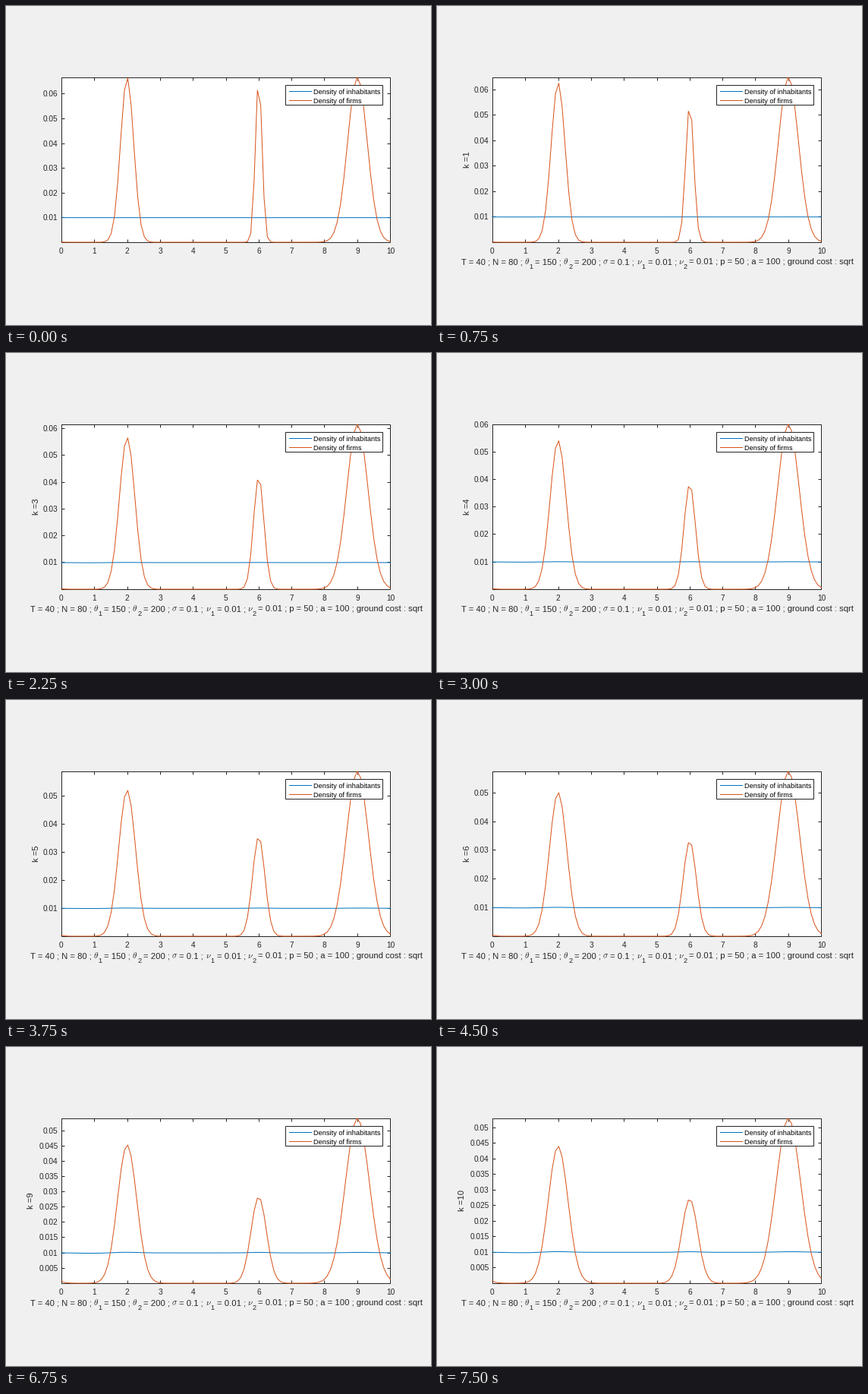
Write a matplotlib script that moves like this. It is 560 px wide and 420 px high and loops after 8 s.

```python
import numpy as np
import matplotlib as mpl
import matplotlib.pyplot as plt
from matplotlib.animation import FuncAnimation
from matplotlib.patches import Rectangle

mpl.rcParams["font.family"] = "Liberation Sans"
mpl.rcParams["mathtext.fontset"] = "cm"

W, H, DPI = 560, 420, 100
PX = 72 / DPI
FONT_SCALE = 1.018
STEP_MS, TICKS_PER_STEP, FRAMES = 250, 3, 32

# Data area, and the pixel lines of its border
LEFT, RIGHT, TOP, BOTTOM = 72.9, 506.4, 94.0, 311.0
X0, X1, Y0, Y1 = 73, 506, 94, 311
INK = "#262626"
BLUE, ORANGE = "#0072bd", "#d95319"
TICK = 4

# Peaks of the firm density: centre, spread, slow loss per step
PEAKS = ((2, 0.2, 0.001), (6, 0.1, 0.0006), (9, 0.3, 0.001))
SPREAD = 0.005
FLOOR = 0.001

x = np.linspace(0, 10, 100)


def bump(centre, var):
    # The domain is periodic
    return sum(np.exp(-(x - centre - s) ** 2 / (2 * var))
               for s in (-10.1, 0, 10.1))


def firms(k):
    total = sum(bump(c, s * s) for c, s, _ in PEAKS) + FLOOR
    y = np.full_like(x, FLOOR)
    for c, s, loss in PEAKS:
        var = s * s + SPREAD * k
        y += (1 - loss * k) * s / np.sqrt(var) * bump(c, var)
    return y / total.sum()


def inhabitants(k):
    rise = bump(1.95, 0.14) + 0.8 * bump(6, 0.09) + 0.8 * bump(9.1, 0.2)
    return 0.01 + k * 1e-5 * (2.2 * rise - 1.4 * bump(0.95, 0.2))


fig = plt.figure(figsize=(W / DPI, H / DPI), dpi=DPI, facecolor="#f0f0f0")
ax = fig.add_axes([0, 0, 1, 1])
ax.set_xlim(0, W)
ax.set_ylim(H, 0)
ax.axis("off")


def text(px, py, s, size=10, color=INK, **kw):
    kw.setdefault("va", "baseline")
    return ax.text(px, py, s, fontsize=size * PX * FONT_SCALE,
                   color=color, **kw)


def line(px, py, color, z, **kw):
    return ax.plot(px, py, color=color, lw=PX, zorder=z, **kw)[0]


def box(x0, y0, x1, y1, face, z):
    return ax.add_patch(Rectangle((x0, y0), x1 - x0, y1 - y0, lw=PX,
                                  facecolor=face, edgecolor=INK, zorder=z))


def to_x(v):
    return LEFT + (RIGHT - LEFT) * v / 10


# Plot area and horizontal axis
box(X0, Y0, X1, Y1, "white", 1)
for n in range(11):
    tx = round(X0 + (X1 - X0) * n / 10)
    line([tx, tx], [Y1, Y1 - TICK], INK, 2, solid_capstyle="butt")
    line([tx, tx], [Y0, Y0 + TICK], INK, 2, solid_capstyle="butt")
    text(to_x(n), 325.5, str(n), ha="center")

marks = line([], [], INK, 2, solid_capstyle="butt")
blue = line(to_x(x), x, BLUE, 3, snap=False)
orange = line(to_x(x), x, ORANGE, 4, snap=False)
labels = [text(68.5, 0, "", ha="right") for _ in range(11)]

# Legend
box(368, 104, 496, 130, "white", 6)
for ky, color, name in ((112, BLUE, "inhabitants"), (124, ORANGE, "firms")):
    line([373, 402], [ky, ky], color, 7)
    text(405, ky + 3.7, f"Density of {name}", 9, "black", zorder=7)

# Caption pieces; a leading underscore marks a subscript
CAPTION = (
    (32, "T = 40 ; N = 80 ;"), (115, r"$\theta$"), (121, "_1"),
    (129, "= 150 ;"), (166.5, r"$\theta$"), (173, "_2"),
    (181, "= 200 ;"), (218.5, r"$\sigma$"), (228, "= 0.1 ;"),
    (263, r"$\nu$"), (269.5, "_1"), (277.5, "= 0.01 ;"),
    (317.5, r"$\nu$"), (324, "_2"),
    (332.5, "= 0.01 ; p = 50 ; a = 100 ; ground cost : sqrt"),
)
caption = [text(cx, 345.5, s[1:], 9) if s[0] == "_"
           else text(cx, 340.5, s, 11) for cx, s in CAPTION]
step_label = text(0, 202, "", 11, rotation=90, ha="right", va="center")


def draw(i):
    k = i // TICKS_PER_STEP
    f = firms(k)
    lo, hi = f.min(), f.max()

    def to_y(v):
        return BOTTOM - (BOTTOM - TOP) * (v - lo) / (hi - lo)

    orange.set_ydata(to_y(f))
    blue.set_ydata(to_y(inhabitants(k)))

    gap = 0.005 if k >= 9 else 0.01
    values = np.arange(1, int((hi + 2e-4) / gap) + 1) * gap
    mx, my = [], []
    for n, label in enumerate(labels):
        if n >= len(values):
            label.set_text("")
            continue
        ty = max(to_y(values[n]), TOP)
        row = np.floor(ty)
        mx += [X0, X0 + TICK, np.nan, X1 - TICK, X1, np.nan]
        my += [row, row, np.nan, row, row, np.nan]
        label.set_text(f"{values[n]:.3f}".rstrip("0"))
        label.set_y(row + 4)
    marks.set_data(mx, my)

    for part in caption:
        part.set_visible(k > 0)
    step_label.set_text(f"k ={k}" if k else "")
    step_label.set_x(38 if k >= 9 else 45)
    return [orange, blue, marks, step_label, *labels, *caption]


anim = FuncAnimation(fig, draw, frames=FRAMES, interval=STEP_MS,
                     init_func=lambda: draw(0), repeat=True, repeat_delay=0)
plt.show()
```
